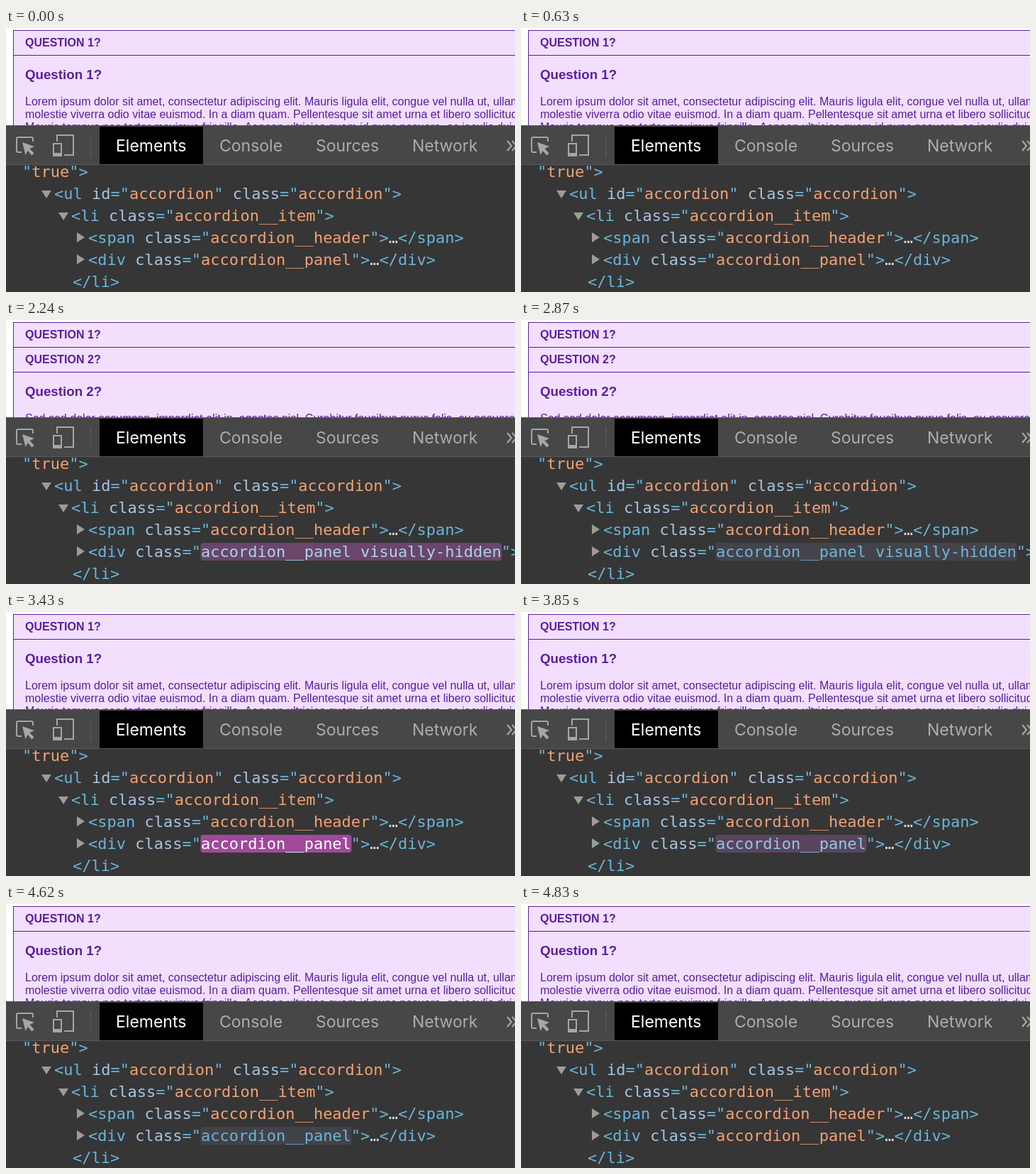
An HTML page with a canvas that plays this animation: 718x372 px, repeating every 4.9 s.

```html
<!DOCTYPE html>
<html lang="en">
<head>
<meta charset="utf-8">
<title>Accordion inspector</title>
<style>
  html, body { margin: 0; width: 100%; height: 100%; overflow: hidden; background: #fff; }
  canvas { display: block; }
</style>
</head>
<body>
<canvas id="stage" width="718" height="372"></canvas>
<script>
const ctx = document.getElementById('stage').getContext('2d');
const LOOP = 4900, HIDE_AT = 1960, SHOW_AT = 3430, FLASH = 1400;
const SANS = '"Liberation Sans", Arial, sans-serif';
const MONO = '22px "DejaVu Sans Mono", monospace';
const CHAR = 22 * 0.60205;
const PURPLE = '#5a1f9c';
const TAG = '#6ab5da', NAME = '#a5c5e5', VALUE = '#f3a174', PLAIN = '#d8d8d8';
const FLASH_BG = [160, 73, 155], REST_BG = [66, 67, 72];
const FLASH_INK = [255, 255, 255], REST_INK = [106, 181, 218];

const mix = (a, b, k) => `rgb(${a.map((v, i) => Math.round(v + (b[i] - v) * k))})`;

// cubic-bezier(0, 0, 0.2, 1), solved by bisection
function easeOut(x) {
  let lo = 0, hi = 1;
  for (let i = 0; i < 24; i++) {
    const s = (lo + hi) / 2;
    if (0.6 * s * s * (1 - s) + s ** 3 < x) lo = s; else hi = s;
  }
  return lo * lo * (3 - 2 * lo);
}

function rect(x, y, w, h, color) {
  ctx.fillStyle = color;
  ctx.fillRect(x, y, w, h);
}

function text(str, x, y, font, color) {
  ctx.font = font;
  ctx.fillStyle = color;
  ctx.fillText(str, x, y);
}

function shape(points, color) {
  ctx.fillStyle = color;
  ctx.beginPath();
  points.forEach(([x, y]) => ctx.lineTo(x, y));
  ctx.fill();
}

function stroke(path, color, width) {
  ctx.strokeStyle = color;
  ctx.lineWidth = width;
  ctx.stroke(new Path2D(path));
}

function header(n, y) {
  rect(10, y, 708, 1, PURPLE);
  text(`QUESTION ${n}?`, 27, y + 23, `bold 16px ${SANS}`, PURPLE);
}

function panel(n, y, lines) {
  rect(10, y, 708, 1, PURPLE);
  text(`Question ${n}?`, 27, y + 34, `bold 18.72px ${SANS}`, PURPLE);
  lines.forEach((line, i) => text(line, 27, y + 71 + i * 18, `16px ${SANS}`, PURPLE));
}

function drawPage(hidden) {
  rect(0, 0, 718, 138, '#fff');
  rect(10, 3, 708, 135, '#f2dffe');
  rect(10, 3, 1, 135, PURPLE);
  header(1, 3);
  if (hidden) {
    header(2, 38);
    panel(2, 73, ['Sed sed dolor accumsan, imperdiet elit in, egestas nisl. Curabitur faucibus purus felis, eu posuere']);
  } else {
    panel(1, 38, [
      'Lorem ipsum dolor sit amet, consectetur adipiscing elit. Mauris ligula elit, congue vel nulla ut, ullamcorper',
      'molestie viverra odio vitae euismod. In a diam quam. Pellentesque sit amet urna et libero sollicitudin',
      'Mauris tempus nec tortor maximus fringilla. Aenean ultricies quam id nunc posuere, ac iaculis dui'
    ]);
  }
}

function drawToolbar() {
  const grey = '#a6a6a6', tabFont = '23px Inter, sans-serif';
  rect(0, 137, 718, 56, '#474747');
  rect(0, 137, 718, 1, '#5b5b5b');
  rect(0, 192, 718, 1, '#595959');
  rect(119, 150, 1, 32, '#5e5e5e');
  rect(132, 139, 146, 53, '#000');

  stroke('M22 175H17Q15 175 15 173V156Q15 154 17 154H36Q38 154 38 156V160', grey, 2);
  shape([[23, 161], [40, 167], [33.5, 170], [39.5, 176.5], [36.5, 179.5], [30.5, 173], [27.5, 179]], grey);
  stroke('M72 160V151H95V179H82', grey, 2);
  stroke('M67 163H78V180H67Z', grey, 2);
  rect(67, 176, 11, 4, grey);

  [['Elements', 155], ['Console', 301], ['Sources', 437], ['Network', 573]].forEach(([label, x], i) =>
    text(label, x, 174, tabFont, i ? '#adadad' : '#fff'));
  stroke('M707 159L713 166L707 173M714 159L720 166L714 173', grey, 2.2);
}

function code(x, y, runs) {
  for (const [str, color] of runs) {
    text(str, x, y, MONO, color);
    x += str.length * CHAR;
  }
}

const attr = (name, value, ink = VALUE) => [[` ${name}`, NAME], ['="', TAG], [value, ink], ['"', TAG]];

function arrow(x, y, open) {
  shape(open ? [[x, y - 5], [x + 14, y - 5], [x + 7, y + 6]]
             : [[x + 1, y - 7], [x + 12, y], [x + 1, y + 7]], '#9c9c9c');
}

function drawMarkup(hidden, age) {
  const value = hidden ? 'accordion__panel visually-hidden' : 'accordion__panel';
  let ink = VALUE;
  rect(0, 193, 718, 179, '#363636');

  if (age >= 0 && age < FLASH) {
    const k = easeOut(Math.min(1, age / (FLASH * 0.8)));
    ink = mix(FLASH_INK, REST_INK, k);
    ctx.fillStyle = mix(FLASH_BG, REST_BG, k);
    ctx.beginPath();
    ctx.roundRect(274.5, 314, value.length * CHAR + 1, 25, 4);
    ctx.fill();
  }

  code(23, 210, [['"', TAG], ['true', VALUE], ['">', TAG]]);
  arrow(50, 234, true);
  code(68, 241, [['<ul', TAG], ...attr('id', 'accordion'), ...attr('class', 'accordion'), ['>', TAG]]);
  arrow(74, 265, true);
  code(92, 272, [['<li', TAG], ...attr('class', 'accordion__item'), ['>', TAG]]);
  arrow(99, 295, false);
  code(116, 303, [['<span', TAG], ...attr('class', 'accordion__header'), ['>', TAG], ['…', PLAIN], ['</span>', TAG]]);
  arrow(99, 326, false);
  code(116, 334, [['<div', TAG], ...attr('class', value, ink), ['>', TAG], ['…', PLAIN], ['</div>', TAG]]);
  code(94, 365, [['</li>', TAG]]);
}

function frame(now) {
  const t = now % LOOP;
  const hidden = t >= HIDE_AT && t < SHOW_AT;
  drawPage(hidden);
  drawMarkup(hidden, t >= SHOW_AT ? t - SHOW_AT : t - HIDE_AT);
  drawToolbar();
  requestAnimationFrame(frame);
}
requestAnimationFrame(frame);
</script>
</body>
</html>
```
